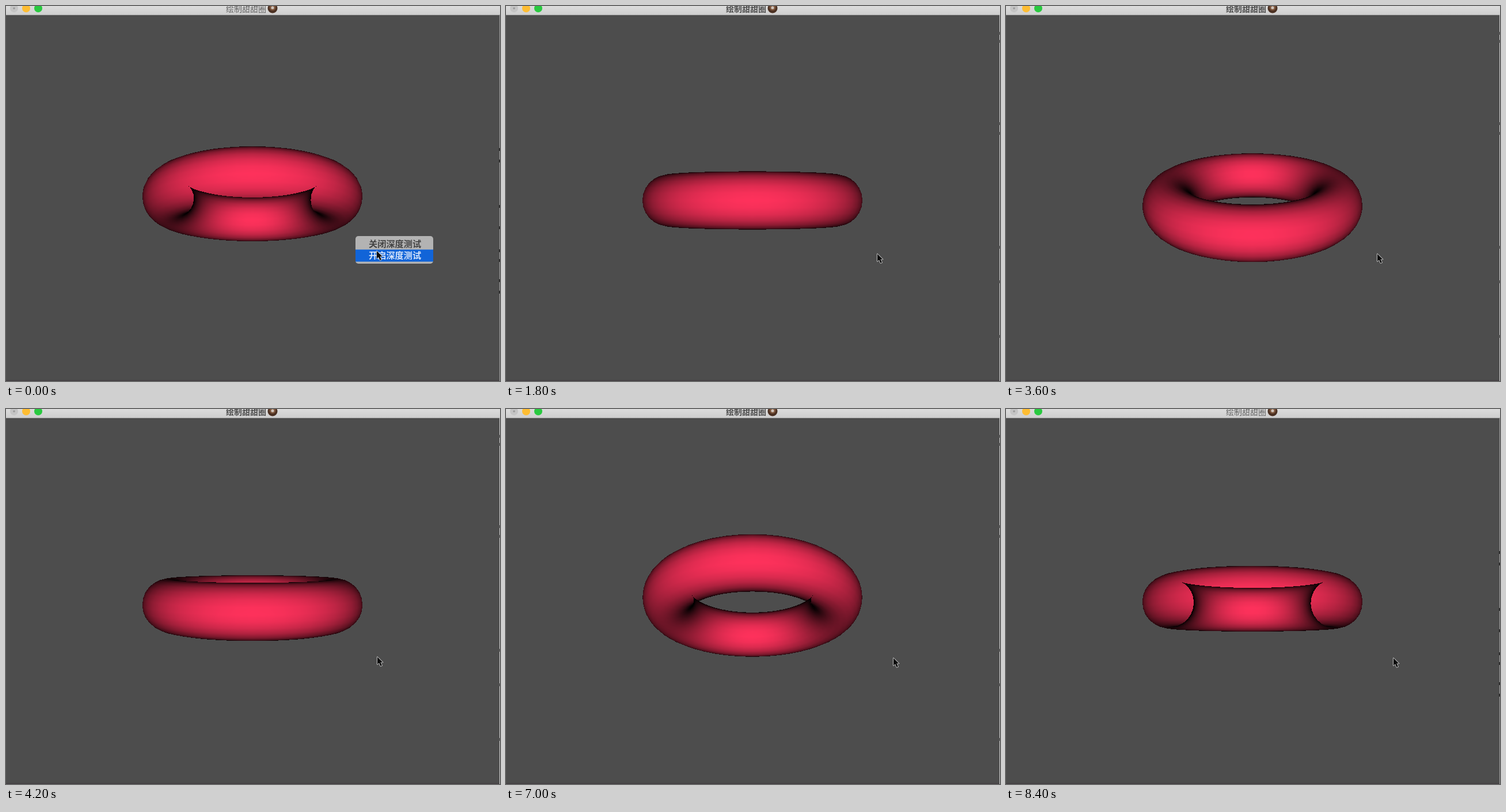
An HTML page with a canvas for the animation above (8600 ms loop, 858 px wide and 652 px high).

```html
<!DOCTYPE html>
<html lang="zh">
<head>
<meta charset="utf-8">
<style>
  html, body { margin: 0; width: 100%; height: 100%; overflow: hidden; background: #4d4d4d; }
  canvas { display: block; }
</style>
</head>
<body>
<canvas id="stage" width="858" height="652"></canvas>
<script>
const ctx = document.getElementById('stage').getContext('2d');
const STEP = 200, LOOP = 8600, TAU = Math.PI * 2;
const FONT = '"Noto Sans CJK SC", "Noto Sans CJK", "Noto Sans", sans-serif';

// Tilt in degrees at [step, tilt]; steps between are linear
const TILTS = [[0, -15], [2, -15], [4, -25], [12, 15], [13, 15], [16, 30],
               [22, 0], [30, 0], [36, -30], [41, -5], [42, -5]];

// Torus mesh, camera and the pixel window it is drawn into
const MAJOR = 52, MINOR = 26, RING = 1, TUBE = 0.3, EYE = 7, FOCAL = 1013;
const CX = 428, CY = 338;
const view = { x: 228, y: 196, w: 400, h: 284 };
const image = ctx.createImageData(view.w, view.h);
const pixels = new Uint32Array(image.data.buffer);
const depth = new Float32Array(view.w * view.h);

function tiltAt(step) {
  const i = Math.max(1, TILTS.findIndex(k => k[0] >= step));
  const [s0, a0] = TILTS[i - 1], [s1, a1] = TILTS[i];
  return a0 + (a1 - a0) * (step - s0) / (s1 - s0);
}

function vertex(i, j, tilt) {
  const a = i * TAU / MAJOR, b = j * TAU / MINOR;
  const r = RING + TUBE * Math.cos(b), h = TUBE * Math.sin(b);
  const c = Math.cos(tilt), s = Math.sin(tilt);
  const front = r * Math.sin(a);
  const w = 1 / (EYE - front * c - h * s);
  return {
    x: CX - view.x + FOCAL * r * Math.cos(a) * w,
    y: CY - view.y - FOCAL * (h * c - front * s) * w,
    w,
    light: Math.max(0, Math.cos(b) * Math.sin(a) * c + Math.sin(b) * s)
  };
}

function triangle(p, q, r, useDepth) {
  const area = (q.x - p.x) * (r.y - p.y) - (q.y - p.y) * (r.x - p.x);
  if (area <= 0) return; // back face
  const x0 = Math.ceil(Math.min(p.x, q.x, r.x) - 0.5), x1 = Math.max(p.x, q.x, r.x);
  const y0 = Math.ceil(Math.min(p.y, q.y, r.y) - 0.5), y1 = Math.max(p.y, q.y, r.y);
  for (let y = y0; y + 0.5 <= y1; y++) {
    for (let x = x0; x + 0.5 <= x1; x++) {
      const px = x + 0.5, py = y + 0.5;
      const u = ((q.x - px) * (r.y - py) - (q.y - py) * (r.x - px)) / area;
      const v = ((r.x - px) * (p.y - py) - (r.y - py) * (p.x - px)) / area;
      const t = 1 - u - v;
      if (u < -1e-9 || v < -1e-9 || t < -1e-9) continue;
      const at = y * view.w + x, w = u * p.w + v * q.w + t * r.w;
      if (useDepth && w < depth[at]) continue;
      depth[at] = w;
      const k = Math.max(0, u * p.light + v * q.light + t * r.light);
      pixels[at] = 0xff000000 | (92 * k) << 16 | (50 * k) << 8 | 255 * k;
    }
  }
}

function drawTorus(degrees, useDepth) {
  const tilt = degrees * Math.PI / 180;
  pixels.fill(0xff4d4d4d);
  depth.fill(0);
  for (let i = 0; i < MAJOR; i++) {
    for (let j = 0; j < MINOR; j++) {
      const a = vertex(i, j, tilt), b = vertex(i + 1, j, tilt);
      const c = vertex(i + 1, j + 1, tilt), d = vertex(i, j + 1, tilt);
      triangle(a, b, d, useDepth);
      triangle(b, c, d, useDepth);
    }
  }
  ctx.putImageData(image, view.x, view.y);
}

function rect(x, y, w, h, color) {
  ctx.fillStyle = color;
  ctx.fillRect(x, y, w, h);
}

function disc(x, y, r, color) {
  ctx.fillStyle = color;
  ctx.beginPath();
  ctx.arc(x, y, r, 0, TAU);
  ctx.fill();
}

function label(text, x, y, size, color, weight) {
  ctx.font = `${weight} ${size}px ${FONT}`;
  ctx.textBaseline = 'alphabetic';
  ctx.fillStyle = color;
  ctx.fillText(text, x, y);
}

function drawWindow(soft) {
  rect(0, 0, 858, 652, '#4d4d4d');
  const bar = ctx.createLinearGradient(0, 0, 0, 15);
  bar.addColorStop(0, '#dcdcdc');
  bar.addColorStop(1, '#cecece');
  rect(0, 0, 858, 15, bar);
  rect(0, 15, 858, 1, '#a8a8a8');
  disc(14, 4, 7, '#c4c4c4');
  disc(14, 4, 1.8, '#999999');
  disc(35, 4, 7, '#fdbd33');
  disc(56, 4, 7, '#29c940');
  label('绘制甜甜圈', 382, 10, 14, soft ? '#606060' : '#4c4c4c', soft ? 400 : 700);
  disc(463, 4, 8.5, '#4b3022');
  disc(463, 2.5, 5.5, '#7b543b');
  disc(463, 3, 2.6, '#d0c4bb');
  rect(0, 650.5, 858, 1.5, '#433f42');
  rect(857, 15, 1, 637, soft ? '#9a9a9a' : '#c8c8c8');
  const marks = soft ? [250, 270, 349, 386, 426, 443, 478, 498] : [48, 62, 205, 222, 420, 480, 575];
  for (const y of marks) rect(856, y - 3, 2, 5, soft ? '#2c2c2c' : '#555555');
}

function drawMenu(x, y, active) {
  ctx.fillStyle = '#b3b3b3';
  ctx.beginPath();
  ctx.roundRect(x, y, 135, 48, 5);
  ctx.fill();
  ['关闭深度测试', '开启深度测试'].forEach((text, i) => {
    const top = y + 4 + i * 20;
    if (i === active) rect(x, top - 0.5, 135, 21, '#1164d8');
    label(text, x + 23, top + 15, 15.2, i === active ? '#d6e4fa' : '#444444', 700);
  });
}

function drawCursor(x, y) {
  ctx.beginPath();
  [[0, 0], [0, 13], [3, 10.5], [5.5, 16], [8, 15], [5.5, 9.5], [9.5, 9.5]]
    .forEach(([dx, dy]) => ctx.lineTo(x + dx, y + dy));
  ctx.closePath();
  ctx.lineJoin = 'round';
  ctx.lineWidth = 1.6;
  ctx.strokeStyle = '#d8d8d8';
  ctx.stroke();
  ctx.fillStyle = '#0c0c0c';
  ctx.fill();
}

function draw(step) {
  drawWindow(step < 2 || (step >= 25 && step < 31) || step >= 42);
  drawTorus(tiltAt(step), step >= 2 && step < 29);
  if (step < 2) drawMenu(607, 400, 1);
  if (step >= 25 && step < 29) drawMenu(644, 425, step > 25 ? 0 : -1);
  if (step < 2) drawCursor(644, 426);
  else if (step < 26) drawCursor(645, 431);
  else if (step < 27) drawCursor(660, 431);
  else if (step < 29) drawCursor(672, 431);
  else drawCursor(673, 433);
}

const start = performance.now();
let shown = -1;
function tick() {
  const step = Math.floor((performance.now() - start) % LOOP / STEP);
  if (step !== shown) draw(shown = step);
  requestAnimationFrame(tick);
}
tick();
</script>
</body>
</html>
```
